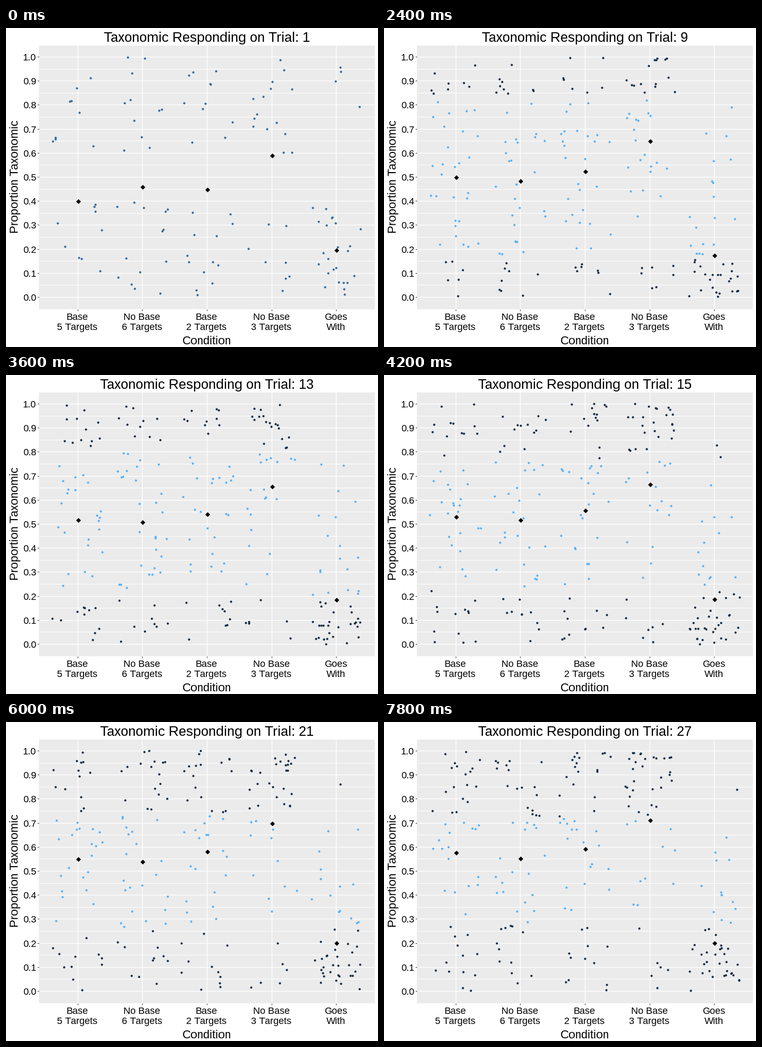
Animation of 700x600 px, one loop 8 s. Source, as a matplotlib script:

```python
from math import comb

import matplotlib.pyplot as plt
import numpy as np
from matplotlib.animation import FuncAnimation
from matplotlib.patches import Rectangle

plt.rcParams.update({
    "font.family": "Liberation Sans",
    "text.hinting": "native",
    "text.hinting_factor": 1,  # whole-pixel letter spacing
})

PX = 0.72  # points per pixel at 100 dpi
TRIALS = 27
DARK, LIGHT, MIXED = "#132B43", "#56B1F7", "#336A98"
LEFT, RIGHT, TOP, BOTTOM = 62, 694, 32.5, 529

LABELS = ["Base\n5 Targets", "No Base\n6 Targets", "Base\n2 Targets",
          "No Base\n3 Targets", "Goes\nWith"]
SIZES = [50, 50, 49, 49, 51]
SPREADS = [1.3, 1.0, 1.4, 1.4, 0.7]
KEY_TRIALS = [1, 5, 9, 11, 15, 21, 27]
KEY_MEANS = [
    [.400, .457, .500, .506, .530, .550, .578],
    [.460, .432, .485, .498, .519, .540, .553],
    [.449, .469, .524, .527, .558, .581, .594],
    [.592, .600, .651, .649, .667, .700, .713],
    [.196, .175, .175, .186, .188, .201, .202],
]


def x_px(group):
    return 134.85 + 121.56 * group


def y_px(share):
    return 506.05 - 452 * share


def pixel_center(x, y):
    return np.column_stack([np.round(x), np.round(y)]) + 0.5


def logit(u):
    return np.log(u / (1 - u))


def simulate(rng, size, spread, means):
    """Cumulative taxonomic choices per trial and person."""
    trials = np.arange(1, TRIALS + 1)
    totals = np.round(np.interp(trials, KEY_TRIALS, means) * trials * size)
    taste = spread * logit((np.arange(size) + 0.5) / size)
    counts = np.zeros((TRIALS, size), int)
    for t, hits in enumerate(np.diff(totals, prepend=0).astype(int)):
        score = taste + logit(rng.uniform(0.001, 0.999, size))
        counts[t, np.argsort(-score)[:max(hits, 0)]] = 1
    return counts.cumsum(axis=0)


def is_significant(k, n):
    """Two-sided binomial test against chance."""
    return 2 * sum(comb(n, i) for i in range(min(k, n - k) + 1)) / 2**n < 0.05


def jittered(rng, n):
    """Positions, colours and group means after n trials."""
    points, colors, means = [], [], []
    for group, counts in enumerate(people):
        k = counts[n - 1]
        x = x_px(group + rng.uniform(-0.4, 0.4, k.size))
        share = (k + rng.uniform(-0.4, 0.4, k.size)) / n
        seen = (share >= 0) & (share <= 1)
        points.extend(pixel_center(x[seen], y_px(share[seen])))
        colors += [DARK if is_significant(int(c), n) else LIGHT for c in k[seen]]
        means.extend(pixel_center(x_px(group), y_px(k.mean() / n)))
    if n <= 5:
        colors = [MIXED] * len(points)
    return points, colors, means


rng = np.random.default_rng(12)
people = [simulate(rng, *group) for group in zip(SIZES, SPREADS, KEY_MEANS)]
states = [jittered(rng, n) for n in range(1, TRIALS + 1)]

fig = plt.figure(figsize=(7, 6), dpi=100, facecolor="white")
ax = fig.add_axes([0, 0, 1, 1])
ax.set(xlim=(0, 700), ylim=(600, 0))
ax.axis("off")


def write(x, y, text, size, **kw):
    kw = {"ha": "center", "va": "baseline", **kw}
    return ax.text(x, y, text, fontsize=size * PX, color="black", **kw)


def rule(xs, ys, color, width=1):
    ax.plot(xs, ys, color=color, lw=width * PX, solid_capstyle="butt", zorder=2)


ax.add_patch(Rectangle((LEFT, TOP), RIGHT - LEFT, BOTTOM - TOP, fc="#EBEBEB", lw=0))
for i in range(21):
    y = y_px(i / 20)
    rule([LEFT, RIGHT], [y, y], "white", 1 if i % 2 else 1.4)
    if i % 2 == 0:
        rule([LEFT - 3, LEFT], [y, y], "#333333")
        write(57, y + 7, f"{i / 20:.1f}", 18, ha="right")
for group, label in enumerate(LABELS):
    x = x_px(group)
    rule([x, x], [TOP, BOTTOM], "white", 1.4)
    rule([x, x], [BOTTOM, BOTTOM + 3], "#333333")
    for row, text in enumerate(label.split("\n")):
        write(x - 0.5, 549 + 19 * row, text, 18)

write(378, 595, "Condition", 22)
write(23, 279.5, "Proportion Taxonomic", 22, rotation=90,
      rotation_mode="anchor")
title = write(378, 26, "", 26)
dots = ax.scatter([], [], s=(4.1 * PX) ** 2, linewidths=0, zorder=3)
diamonds = ax.scatter([], [], s=(6.4 * PX) ** 2, marker="D", color="black",
                      linewidths=0, zorder=4)


def update(frame):
    trial = frame // 3 + 1
    points, colors, means = states[trial - 1]
    title.set_text(f"Taxonomic Responding on Trial: {trial}")
    dots.set_offsets(points)
    dots.set_facecolors(colors)
    diamonds.set_offsets(means)
    return title, dots, diamonds


anim = FuncAnimation(fig, update, frames=80, interval=100, repeat=True,
                     repeat_delay=0)
plt.show()
```
